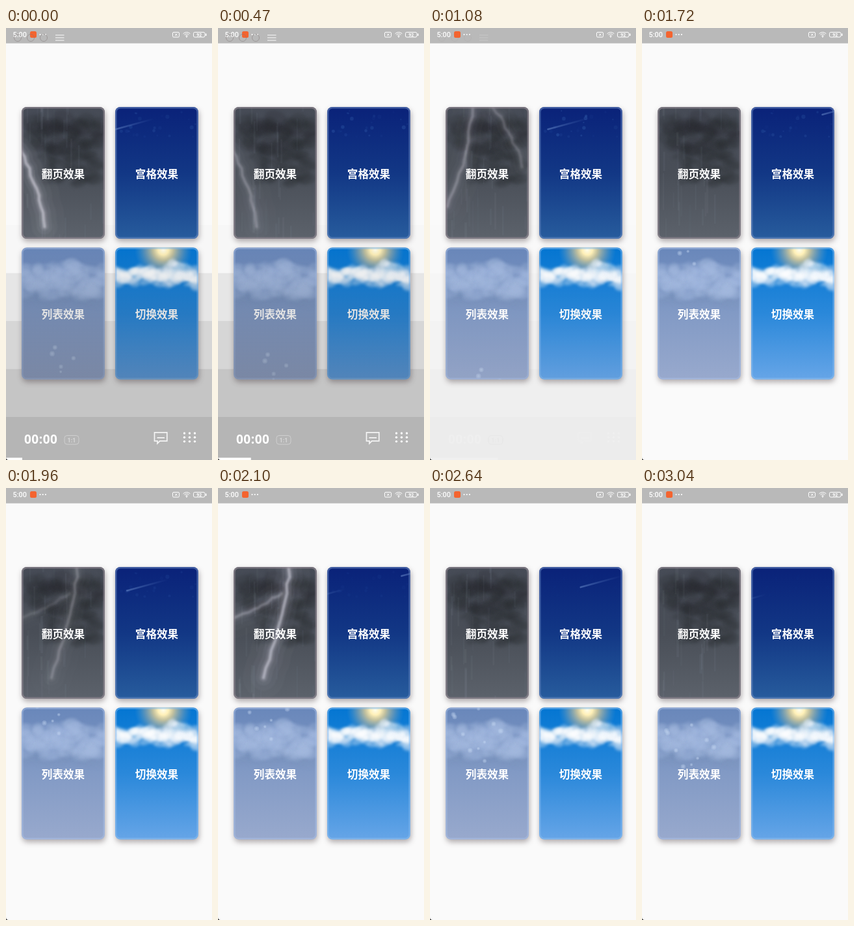
Write an HTML page with a canvas that moves like this. It is 317x662 px and loops after 3.14 s.

```html
<!DOCTYPE html>
<html lang="zh">
<head>
<meta charset="utf-8">
<title>天气卡片</title>
<style>
html, body { margin: 0; width: 317px; height: 662px; overflow: hidden; background: #fafafa }
canvas { display: block }
</style>
</head>
<body>
<canvas id="stage" width="317" height="662"></canvas>
<script>
const LOOP = 3140, W = 317, H = 662, CW = 128, CH = 202;
const c = document.getElementById('stage').getContext('2d');
const clamp = (v, a = 0, b = 1) => Math.min(b, Math.max(a, v));
const lerp = (a, b, u) => a + (b - a) * u;

function seeded(s) {
  return () => {
    s = (s * 1664525 + 1013904223) >>> 0;
    return s / 4294967296;
  };
}

const cards = [
  { x: 24, y: 121, label: '翻页效果', sky: ['#464b56', '#494e57', '#5c626b'], edge: 'rgba(150,140,150,.6)', draw: storm },
  { x: 168, y: 121, label: '宫格效果', sky: ['#0a2279', '#123785', '#275c9d'], edge: 'rgba(110,140,195,.55)', draw: night },
  { x: 24, y: 336.5, label: '列表效果', sky: ['#6987ba', '#829ac5', '#98a9cd'], edge: 'rgba(170,192,230,.5)', draw: snow },
  { x: 168, y: 336.5, label: '切换效果', sky: ['#0476d2', '#2a88da', '#66a5e7'], edge: 'rgba(140,190,240,.5)', draw() {} }
];

function box(g, k) {
  g.beginPath();
  g.roundRect(k.x, k.y, CW, CH, 8);
}

function inside(g, k, paint) {
  g.save();
  box(g, k);
  g.clip();
  paint();
  g.restore();
}

function vertical(g, y0, y1, colors) {
  const fill = g.createLinearGradient(0, y0, 0, y1);
  colors.forEach((col, i) => fill.addColorStop(i / (colors.length - 1), col));
  return fill;
}

function dot(g, x, y, r) {
  g.beginPath();
  g.arc(x, y, r, 0, 7);
  g.fill();
}

// Cloud of soft puffs scattered around a wavy middle line
function cloud(g, color, n, x, y, w, h, r, seed) {
  const rnd = seeded(seed);
  g.filter = 'blur(2px)';
  g.fillStyle = color;
  for (let i = 0; i < n; i++) {
    const px = x + w * i / n + rnd() * 6;
    const py = y + (rnd() - .5) * h + 3 * Math.sin(px / 9);
    g.beginPath();
    g.ellipse(px, py, r * (.6 + rnd()), r * (.4 + rnd() * .5), rnd() - .5, 0, 7);
    g.fill();
  }
  g.filter = 'none';
}

const skies = document.createElement('canvas');
skies.width = W;
skies.height = H;
{
  const g = skies.getContext('2d');
  for (const k of cards) {
    g.save();
    g.shadowColor = 'rgba(40,25,30,.36)';
    g.shadowBlur = 8;
    g.shadowOffsetX = 1;
    g.shadowOffsetY = 4;
    g.fillStyle = vertical(g, k.y, k.y + CH, k.sky);
    box(g, k);
    g.fill();
    g.restore();
  }
  inside(g, cards[0], () => {
    cloud(g, 'rgba(44,45,50,.26)', 60, 34, 160, 112, 44, 12, 5);
    cloud(g, 'rgba(44,45,50,.26)', 46, 56, 208, 84, 56, 10, 9);
  });
  inside(g, cards[2], () => {
    cloud(g, 'rgba(125,148,190,.2)', 24, 24, 412, 128, 16, 12, 3);
    cloud(g, 'rgba(167,188,224,.28)', 100, 24, 387, 128, 44, 12, 21);
  });
  inside(g, cards[3], () => {
    const sun = g.createRadialGradient(242, 340, 0, 242, 340, 44);
    sun.addColorStop(0, '#fffdec');
    sun.addColorStop(.18, '#fff0b8');
    sun.addColorStop(.36, 'rgba(226,205,150,.85)');
    sun.addColorStop(.65, 'rgba(175,175,160,.5)');
    sun.addColorStop(1, 'rgba(110,160,195,0)');
    g.fillStyle = sun;
    g.fillRect(168, 336, CW, 60);
    cloud(g, 'rgba(225,236,247,.4)', 48, 166, 381, 130, 26, 8, 14);
    cloud(g, 'rgba(255,255,255,.55)', 50, 166, 378, 130, 13, 7, 8);
    cloud(g, 'rgba(240,246,252,.45)', 20, 246, 371, 50, 22, 7, 2);
    cloud(g, 'rgba(120,180,225,.25)', 6, 258, 371, 26, 6, 6, 4);
  });
}

const bolts = [
  { peak: 180, power: 1, from: [22, 186], to: [60, 304] },
  { peak: 800, power: 1, from: [67, 121], to: [27, 275] },
  { peak: 800, power: .7, from: [98, 121], to: [141, 213] },
  { peak: 2080, power: 1, from: [110, 121], to: [69, 289] },
  { peak: 2080, power: .5, from: [99, 160], to: [24, 199] }
];

function strike({ from, to }, alpha, seed) {
  const rnd = seeded(seed), line = new Path2D();
  for (let i = 0; i <= 12; i++) {
    const u = i / 12, bend = Math.sin(Math.PI * u) * 6;
    line.lineTo(lerp(from[0], to[0], u) + bend + rnd() * 5 - 2.5, lerp(from[1], to[1], u) + rnd() * 4 - 2);
  }
  c.lineJoin = c.lineCap = 'round';
  c.filter = 'blur(1px)';
  for (const width of [64, 40, 24, 13, 7, 3.5]) {
    c.lineWidth = width;
    c.strokeStyle = `rgba(222,220,232,${alpha * Math.min(.5, 1.5 / width)})`;
    c.stroke(line);
  }
  c.filter = 'none';
}

function storm(t) {
  const rnd = seeded(77);
  for (let i = 0; i < 36; i++) {
    const x = 26 + rnd() * 124, len = 18 + rnd() * 40, speed = .25 + rnd() * .3;
    const y = 75 + (rnd() * 290 + t * speed) % 290;
    c.fillStyle = `rgba(170,182,195,${.02 + rnd() * .05})`;
    c.fillRect(x, y, 1.5 + rnd() * 2.5, len);
  }
  bolts.forEach((b, i) => {
    const d = t - b.peak;
    const a = d < 0 ? 1 + d / 200 : 1 - d / 530;
    if (a > 0) strike(b, a * b.power, i + 3);
  });
}

// Each later meteor is slower and enters a little lower
const launches = [-80, 823, 1675, 2062, 2398];

function meteor(t, launch, i) {
  const run = (t - launch) * (.5 - .06 * i), slope = .27, len = 63;
  const x = 295 - run, y = 121 + 3.5 * i + run * slope;
  const tail = c.createLinearGradient(x, y, x + len, y - len * slope);
  tail.addColorStop(0, 'rgba(140,175,230,.4)');
  tail.addColorStop(1, 'rgba(110,150,215,0)');
  c.strokeStyle = tail;
  c.lineWidth = 2.6;
  c.lineCap = 'round';
  c.beginPath();
  c.moveTo(x, y);
  c.lineTo(x + len, y - len * slope);
  c.stroke();
}

function night(t) {
  const glow = clamp(Math.sin(Math.PI * (t + 400) / 2700), .04);
  const rnd = seeded(31);
  for (let i = 0; i < 26; i++) {
    const x = 172 + rnd() * 122, y = 123 + rnd() * 44, r = .8 + rnd() * 2.4;
    const blink = .5 + .5 * Math.sin(t / 350 + rnd() * 6);
    c.fillStyle = `rgba(80,135,205,${.24 * glow * blink})`;
    dot(c, x, y, r);
  }
  launches.forEach((launch, i) => meteor(t, launch, i));
}

const flurries = [
  { count: 5, born: -4900, spread: 1200, speed: .038 },
  { count: 10, born: 1300, spread: 1400, speed: .062 }
];

function snow(t) {
  const rnd = seeded(12);
  c.fillStyle = 'rgba(200,220,242,.28)';
  for (const f of flurries) {
    for (let i = 0; i < f.count; i++) {
      const age = t - f.born - f.spread * (i + rnd()) / f.count;
      const x = 34 + rnd() * 82 + age * .004, y = 336 + age * f.speed, r = 2 + rnd() * 2;
      dot(c, x, y, r);
      dot(c, x, y, r * .55);
    }
  }
}

function text(s, x, y, font, color = '#fff', align = 'left') {
  c.font = font;
  c.fillStyle = color;
  c.textAlign = align;
  c.fillText(s, x, y);
}

function outline(x, y, w, h, r, color) {
  c.strokeStyle = color;
  c.lineWidth = 1;
  c.beginPath();
  c.roundRect(x, y, w, h, r);
  c.stroke();
}

function statusBar() {
  c.fillStyle = '#b9b9b9';
  c.fillRect(0, 0, W, 23.5);
  text('5:00', 10.5, 14, '500 10.8px Roboto, sans-serif');
  c.fillStyle = '#f4642f';
  c.beginPath();
  c.roundRect(37, 5, 10, 10, 2.5);
  c.fill();
  c.fillStyle = '#fff';
  for (let i = 0; i < 3; i++) dot(c, 52.5 + i * 4.2, 10, 1.1);
  outline(256.5, 6.5, 10, 7.5, 1.5, '#fff');
  c.beginPath();
  c.moveTo(260, 8.5); c.lineTo(263.5, 12);
  c.moveTo(263.5, 8.5); c.lineTo(260, 12);
  c.stroke();
  for (let r = 2.5; r < 8; r += 2.5) {
    c.beginPath();
    c.arc(278, 14, r, -Math.PI * .76, -Math.PI * .24);
    c.stroke();
  }
  dot(c, 278, 13.6, 1);
  outline(288.5, 6.5, 17.5, 7.5, 2, '#fff');
  c.fillRect(307, 8.5, 1.5, 3.5);
  text('92', 297.3, 12.9, 'bold 7px Roboto, sans-serif', '#fff', 'center');
}

// Stepped dark veil, growing towards the bottom
function veil(alpha) {
  for (let i = 0; i < 5; i++) {
    const y = 302 + 73.5 * i;
    c.fillStyle = `rgba(0,0,0,${(.01 + .067 * i) * alpha})`;
    c.fillRect(0, y, W, i < 4 ? 73.5 : H - y);
  }
}

function controls(t, alpha) {
  c.globalAlpha = alpha;
  c.strokeStyle = 'rgba(130,120,120,.5)';
  c.lineWidth = 1;
  for (let x = 18; x < 60; x += 20) {
    c.beginPath();
    c.arc(x, 15, 5.5, 0, 7);
    c.stroke();
  }
  c.fillStyle = '#dedede';
  for (let y = 10; y < 20; y += 4) c.fillRect(76, y, 13.5, 1.8);

  c.letterSpacing = '.5px';
  text('00:00', 28, 637.3, '600 19px "Noto Sans", sans-serif');
  c.letterSpacing = '0px';
  outline(90, 624.5, 22, 13.5, 4, '#cfcfcf');
  text('1:1', 101, 635, 'bold 9px Roboto, sans-serif', '#d8d8d8', 'center');

  c.strokeStyle = '#f4f4f4';
  c.lineWidth = 1.7;
  c.stroke(new Path2D('M228.5 619.8h19.3v13h-11l-3.8 3.8v-3.8h-4.5zM232.5 627.8h11.5'));

  c.fillStyle = '#fff';
  for (let i = 0; i < 9; i++) dot(c, 274.5 + i % 3 * 8, 621 + (i / 3 | 0) * 6.3, 1.7);
  c.fillRect(0, 658.5, 25 + (t - 180) * .0885, 3.5);
  c.globalAlpha = 1;
}

function render(now) {
  const t = clamp(now % LOOP, 180, 3040);
  const panel = clamp((1140 - t) / 300);

  c.fillStyle = '#fafafa';
  c.fillRect(0, 0, W, H);
  veil(panel);
  c.drawImage(skies, 0, 0);
  for (const k of cards) {
    inside(c, k, () => {
      k.draw(t);
      box(c, k);
      c.filter = 'blur(.7px)';
      c.strokeStyle = k.edge;
      c.lineWidth = 5;
      c.stroke();
      c.filter = 'none';
    });
    text(k.label, k.x + 64, k.y + 108.7, 'bold 16.6px "Noto Sans CJK SC", "Noto Sans CJK", sans-serif', '#fff', 'center');
    if (k.y > 300 && panel) {
      c.globalAlpha = panel;
      c.fillStyle = vertical(c, 336, 540, ['rgba(0,0,0,.02)', 'rgba(0,0,0,.11)', 'rgba(0,0,0,.2)']);
      box(c, k);
      c.fill();
      c.globalAlpha = 1;
    }
  }
  statusBar();
  if (panel) controls(t, panel);

  // Rounded screen corner
  c.fillStyle = '#222';
  c.fill(new Path2D('M0 658q0 4 4 4h-4z'));
}

const start = performance.now();
function tick() {
  render(performance.now() - start);
  requestAnimationFrame(tick);
}
tick();
</script>
</body>
</html>
```
